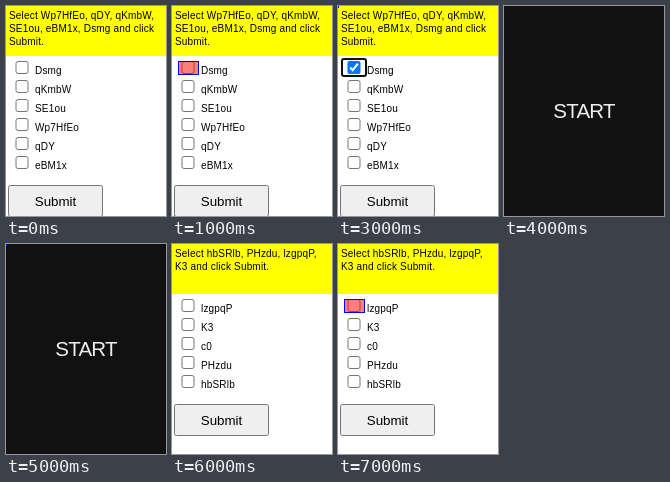
These frames come from a looping animation (160x210 px, 8 s). An HTML page:

```html
<!DOCTYPE html>
<html lang="en">
<head>
<meta charset="utf-8">
<title>Checkbox task</title>
<style>
  html, body { margin: 0; width: 100%; height: 100%; overflow: hidden; background: #fff; }
  body { position: relative; font: 10px/13px Arial, "Liberation Sans", sans-serif; letter-spacing: .18px; color: #000; }

  .stage { position: absolute; left: 0; top: 0; width: 160px; height: 210px; overflow: hidden; white-space: nowrap; pointer-events: none; user-select: none; }
  .screen { position: absolute; inset: 0; }

  .query { box-sizing: border-box; height: 50px; padding: 3px; margin-bottom: 2px; background: #ff0; }
  .row { display: flex; align-items: flex-start; height: 19px; margin-left: 2px; }
  .row span { padding-top: 6px; }
  input { flex: none; width: 20px; height: 13px; margin: 3px 3px 3px 4px; }
  button { display: block; box-sizing: border-box; width: 95px; height: 32px; margin: 13px 0 0 2px; padding: 0; font: 13.333px Arial, "Liberation Sans", sans-serif; }

  .cover { background: #111; color: #eee; font-size: 20.5px; letter-spacing: -.8px; line-height: 210px; text-align: center; }

  .hot, .ring, .tick { position: absolute; box-sizing: border-box; }
  .hot { left: 6px; top: 55px; width: 21px; height: 14px; border: 1px solid #00f; background: rgba(255, 0, 0, .5); background-clip: padding-box; }
  .ring { left: 3px; top: 52px; width: 26px; height: 19px; border: 2px solid #101010; border-radius: 3px; }
  .tick { left: 6px; top: 55px; margin: 0; }
  .dot { position: absolute; left: 0; top: 0; width: 1px; height: 2px; background: #00f; }

  /* One step is 12.5% of the loop, i.e. one second. */
  .first, .cover, .second, .hot, .ring, .tick, .empty, .dot { animation: 8s step-end infinite; }
  .first { animation-name: first; }
  .cover { animation-name: cover; }
  .second { animation-name: second; }
  .first .hot { animation-name: hover-first; }
  .second .hot { animation-name: hover-second; }
  .ring, .tick { animation-name: checked; }
  .empty { animation-name: unchecked; }
  .dot { animation-name: dot; }

  @keyframes first { 0% { visibility: visible } 50%, 100% { visibility: hidden } }
  @keyframes cover { 0%, 75%, 100% { visibility: hidden } 50% { visibility: visible } }
  @keyframes second { 0% { visibility: hidden } 75%, 100% { visibility: visible } }
  @keyframes hover-first { 0%, 25%, 100% { visibility: hidden } 12.5% { visibility: visible } }
  @keyframes hover-second { 0% { visibility: hidden } 87.5%, 100% { visibility: visible } }
  @keyframes checked { 0%, 50%, 100% { visibility: hidden } 25% { visibility: visible } }
  @keyframes unchecked { 0% { visibility: visible } 25%, 100% { visibility: hidden } }
  @keyframes dot { 0%, 50%, 75%, 100% { visibility: hidden } 37.5%, 62.5% { visibility: visible } }
</style>
</head>
<body>
<div class="stage">
  <div class="screen first">
    <div class="query">Select Wp7HfEo, qDY, qKmbW,<br>SE1ou, eBM1x, Dsmg and click<br>Submit.</div>
    <div class="row"><input class="empty" type="checkbox" tabindex="-1"><span>Dsmg</span></div>
    <div class="row"><input type="checkbox" tabindex="-1"><span>qKmbW</span></div>
    <div class="row"><input type="checkbox" tabindex="-1"><span>SE1ou</span></div>
    <div class="row"><input type="checkbox" tabindex="-1"><span>Wp7HfEo</span></div>
    <div class="row"><input type="checkbox" tabindex="-1"><span>qDY</span></div>
    <div class="row"><input type="checkbox" tabindex="-1"><span>eBM1x</span></div>
    <button type="button" tabindex="-1">Submit</button>
    <input class="tick" type="checkbox" tabindex="-1" checked>
    <div class="ring"></div>
    <div class="hot"></div>
  </div>

  <div class="screen second">
    <div class="query">Select hbSRlb, PHzdu, lzgpqP,<br>K3 and click Submit.</div>
    <div class="row"><input type="checkbox" tabindex="-1"><span>lzgpqP</span></div>
    <div class="row"><input type="checkbox" tabindex="-1"><span>K3</span></div>
    <div class="row"><input type="checkbox" tabindex="-1"><span>c0</span></div>
    <div class="row"><input type="checkbox" tabindex="-1"><span>PHzdu</span></div>
    <div class="row"><input type="checkbox" tabindex="-1"><span>hbSRlb</span></div>
    <button type="button" tabindex="-1">Submit</button>
    <div class="hot"></div>
  </div>

  <div class="screen cover">START</div>
  <div class="dot"></div>
</div>
</body>
</html>
```
